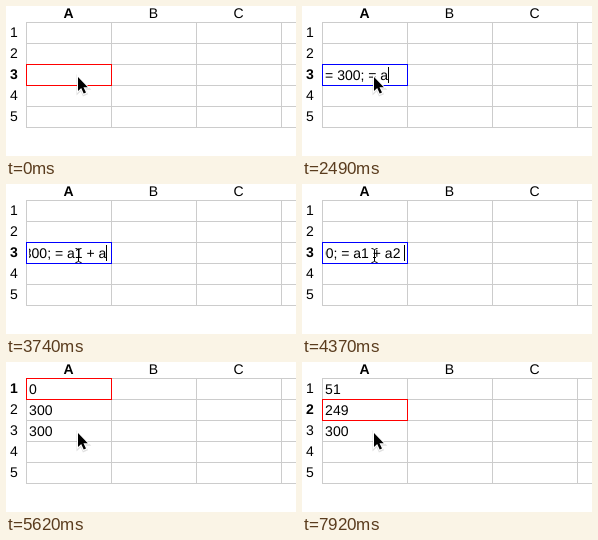
These frames come from a looping animation (290x150 px, 8000 ms). An HTML page:

```html
<!DOCTYPE html>
<html lang="en">
<head>
<meta charset="utf-8">
<title>Spreadsheet</title>
<style>
  html, body { margin: 0; width: 100%; height: 100%; overflow: hidden; background: #fff; }
  svg { display: block; width: 290px; height: 150px; }
  text { font: 14px "Liberation Sans", Arial, sans-serif; white-space: pre; text-rendering: geometricPrecision; }
  .head { text-anchor: middle; }
  .bold { font-weight: bold; }
  .grid { stroke: #ccc; fill: none; shape-rendering: crispEdges; }
  #box { fill: #fff; shape-rendering: crispEdges; }
</style>
</head>
<body>
<svg id="sheet" viewBox="0 0 290 150">
  <clipPath id="field"><rect x="23" y="0" width="80" height="150"/></clipPath>
  <path class="grid" id="grid"/>
  <rect id="box" x="20.5" width="85" height="21"/>
  <g id="labels"></g>
  <g clip-path="url(#field)"><text id="input"></text></g>
  <rect id="caret" width="1" height="16" shape-rendering="crispEdges"/>
  <g id="arrow" transform="translate(72 71)">
    <path d="M0 0V14L3.2 11L5.7 16.6L8 15.6L5.5 10.2H9.8Z" transform="translate(0 1)" fill="none" stroke="#000" stroke-opacity=".12" stroke-width="3"/>
    <path d="M0 0V14L3.2 11L5.7 16.6L8 15.6L5.5 10.2H9.8Z" stroke="#fff" stroke-width="2" paint-order="stroke"/>
  </g>
  <path id="beam" d="M69.5 64.5Q72 64.5 72.5 66Q73 64.5 75.5 64.5M72.5 66V77M69.5 78.5Q72 78.5 72.5 77Q73 78.5 75.5 78.5M71 73.5H74" fill="none" stroke="#000"/>
</svg>
<script>
const LOOP = 8000, TOP = 16, ROW = 21, LEFT = 23.1;
const $ = id => document.getElementById(id);
const pen = document.createElement('canvas').getContext('2d');
pen.font = '14px "Liberation Sans", Arial, sans-serif';

// at: start in ms, row: selected row, text: what is being typed,
// end: caret position once the field scrolls, off: caret blinked out
const solved = ['0', '300', '300'];
const steps = [
  { at: 0, row: 3 },
  { at: 620, row: 3, text: '=' },
  { at: 830, row: 3, text: '= ' },
  { at: 1030, row: 3, text: '= 3' },
  { at: 1240, row: 3, text: '= 300' },
  { at: 1660, row: 3, text: '= 300; ' },
  { at: 2070, row: 3, text: '= 300; ', off: true },
  { at: 2280, row: 3, text: '= 300; = ' },
  { at: 2490, row: 3, text: '= 300; = a' },
  { at: 2700, row: 3, text: '= 300; = a1' },
  { at: 2910, row: 3, text: '= 300; = a1 ' },
  { at: 3110, row: 3, text: '= 300; = a1 + ', end: 100 },
  { at: 3740, row: 3, text: '= 300; = a1 + a', end: 100 },
  { at: 3950, row: 3, text: '= 300; = a1 + a2', end: 101 },
  { at: 4370, row: 3, text: '= 300; = a1 + a2 ', end: 102 },
  { at: 4790, row: 4, cells: solved },
  { at: 5200, row: 3, cells: solved },
  { at: 5410, row: 2, cells: solved },
  { at: 5620, row: 1, cells: solved },
  { at: 6880, row: 1, cells: solved, text: '>' },
  { at: 7090, row: 1, cells: solved, text: '> ' },
  { at: 7290, row: 1, cells: solved, text: '> 5' },
  { at: 7500, row: 1, cells: solved, text: '> 51' },
  { at: 7710, row: 1, cells: solved, text: '> 51', off: true },
  { at: 7920, row: 2, cells: ['51', '249', '300'] }
];

function label(str, x, y, cls) {
  const el = document.createElementNS('http://www.w3.org/2000/svg', 'text');
  el.setAttribute('x', x);
  el.setAttribute('y', y);
  el.setAttribute('class', cls);
  el.textContent = str;
  return $('labels').appendChild(el);
}

function set(id, attrs) {
  for (const key in attrs) $(id).setAttribute(key, attrs[key]);
}

const show = (id, on) => { $(id).style.display = on ? '' : 'none'; };

let grid = '';
for (let i = 0; i < 6; i++) grid += `M20 ${TOP + i * ROW + .5}H290`;
for (let i = 0; i < 4; i++) grid += `M${20.5 + i * 85} ${TOP}V${TOP + 5 * ROW + 1}`;
set('grid', { d: grid });

[...'ABC'].forEach((c, i) => label(c, 62.5 + i * 85, 12, i ? 'head' : 'head bold'));
const rows = [1, 2, 3, 4, 5].map(n => label(n, 8, TOP + (n - 1) * ROW + 15, 'head'));
const cells = [0, 1, 2].map(i => label('', LEFT, TOP + i * ROW + 16, 'cell'));

function draw(step) {
  const { row, text, end, off } = step;
  const y = TOP + (row - 1) * ROW;
  const editing = text !== undefined;
  const values = step.cells || [];

  set('box', { y: y + .5, stroke: editing ? '#00f' : '#f00' });
  rows.forEach((el, i) => el.classList.toggle('bold', i + 1 === row));
  cells.forEach((el, i) => {
    el.textContent = editing && i + 1 === row ? '' : values[i] || '';
  });

  const width = pen.measureText(text || '').width;
  const x = end ? end + .3 - width : LEFT;
  $('input').textContent = text || '';
  set('input', { x, y: y + 16 });
  set('caret', { x: Math.round(x + width), y: y + 3 });
  show('caret', editing && !off);
  show('beam', end);
  show('arrow', !end);
}

const start = performance.now();
let current;
function tick() {
  const t = (performance.now() - start) % LOOP;
  const step = steps.filter(s => s.at <= t).pop();
  if (step !== current) draw(current = step);
  requestAnimationFrame(tick);
}
tick();
</script>
</body>
</html>
```
